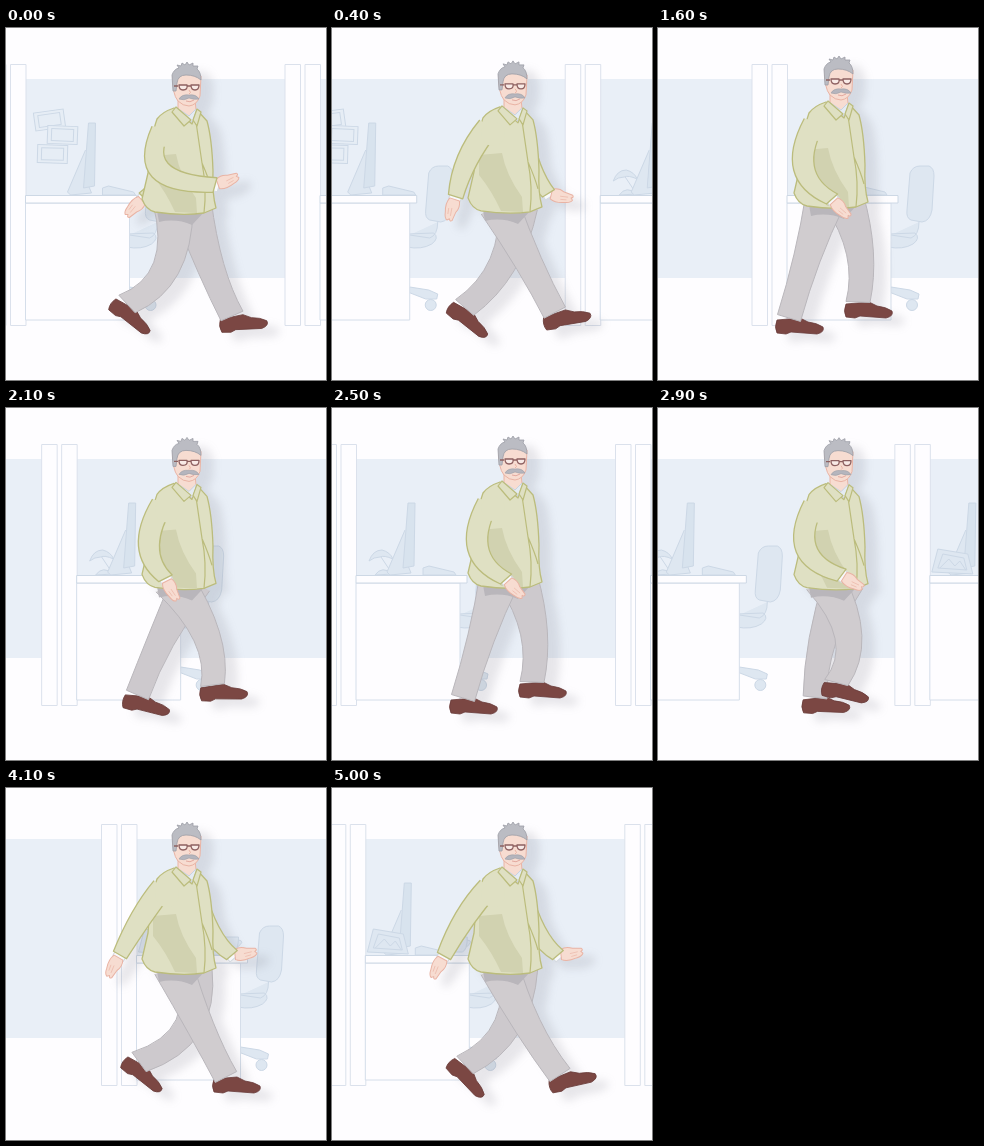
An HTML page with a canvas for the animation above (5.1 s loop, 320 by 352 pixels).

```html
<!DOCTYPE html>
<html lang="en">
<head>
<meta charset="utf-8">
<title>Office walk</title>
<style>
  html, body { margin: 0; width: 100%; height: 100%; overflow: hidden; background: #fefdff; }
  canvas { display: block; }
</style>
</head>
<body>
<canvas id="stage" width="320" height="352"></canvas>
<script>
const stage = document.getElementById('stage').getContext('2d');
const layer = document.createElement('canvas');
layer.width = 320;
layer.height = 352;
const figure = layer.getContext('2d');
let c = stage;

const LOOP = 5100, STEP = 100, STRIDE = 912, SPACING = 294.5;
const WHITE = '#fefdff', LINE = '#ccd8e6', PALE = '#dee7f1';
const OLIVE = '#dfe0c3', OLIVE_EDGE = '#bbbc7c', SKIN = '#f7dcd1', SKIN_EDGE = '#e9b3a4';

// Pose: bob, near elbow + wrist, far elbow + wrist,
// near knee + ankle + foot angle, far knee + ankle + foot angle
const contactA = [0, 154, 142, 209, 157, 161, 148, 138, 170, 160, 240, 121, 276, 34, 205, 240, 226, 288, -7];
const reachA = [0, 154, 142, 210, 157, 160, 147, 136, 169, 157, 241, 118, 278, 38, 206, 238, 229, 288, -11];
const passA = [-6, 146, 140, 174, 171, 180, 125, 175, 158, 149, 230, 131, 290, 0, 202, 225, 200, 274, 0];
const reachB = [0, 133, 130, 112, 168, 205, 143, 226, 167, 196, 238, 228, 287, -17, 175, 238, 133, 277, 42];
const contactB = [0, 135, 130, 114, 167, 205, 143, 226, 167, 195, 240, 220, 289, 0, 182, 238, 133, 274, 34];
const passB = [...passA.slice(0, 9), ...passA.slice(14), ...passA.slice(9, 14)];
const walk = [[0, contactA], [226, passB], [440, reachB], [452, contactB],
  [664, passA], [688, passA], [900, reachA], [STRIDE, contactA]];
const scroll = [[0, [0]], [900, [103]], [1600, [185]], [2500, [290]],
  [3400, [395]], [4100, [478]], [LOOP, [586]]];

function sample(keys, t) {
  const i = keys.findIndex(k => k[0] > t);
  const [t0, a] = keys[i - 1], [t1, b] = keys[i];
  return a.map((v, n) => v + (b[n] - v) * (t - t0) / (t1 - t0));
}

function paint(fill, edge, width = 1) {
  if (fill) { c.fillStyle = fill; c.fill(); }
  if (edge) { c.strokeStyle = edge; c.lineWidth = width; c.stroke(); }
}
function shape(d, fill, edge, width) {
  const path = new Path2D(d);
  if (fill) { c.fillStyle = fill; c.fill(path); }
  if (edge) { c.strokeStyle = edge; c.lineWidth = width || 1; c.stroke(path); }
}
function box(x, y, w, h, fill, edge = LINE) {
  c.beginPath();
  c.rect(x, y, w, h);
  paint(fill, edge);
}
function placed(x, y, angle, draw) {
  c.save();
  c.translate(x, y);
  c.rotate(angle);
  draw();
  c.restore();
}

// Tapered limb through three joints, with no edge across its top
function limb(points, widths, fill, edge, lineWidth) {
  const side = s => points.map(([x, y], i) => {
    const a = points[Math.max(i - 1, 0)], b = points[Math.min(i + 1, 2)];
    const dx = b[0] - a[0], dy = b[1] - a[1], k = s * widths[i] / Math.hypot(dx, dy);
    return [x - dy * k, y + dx * k];
  });
  const curve = ([p, q, r]) =>
    c.quadraticCurveTo(2 * q[0] - (p[0] + r[0]) / 2, 2 * q[1] - (p[1] + r[1]) / 2, ...r);
  const left = side(1), right = side(-1).reverse();
  c.beginPath();
  c.moveTo(...left[0]);
  curve(left);
  c.lineTo(...right[0]);
  curve(right);
  paint(fill, edge, lineWidth);
}

function arm(shoulder, ex, ey, wx, wy, widths) {
  const angle = Math.atan2(wy - ey, wx - ex);
  placed(wx, wy, angle, () => box(-2, -6, 6, 12, '#f8f9fb', '#d3d8df'));
  // The hand lifts as it reaches forward
  placed(wx, wy, angle - 0.021 * Math.max(0, wx - 180), () => {
    shape('M3-5 Q9-8 15-5 L24-4 Q26-2 23-1 L25 1 Q24 4 18 5 Q9 8 3 5Z', SKIN, SKIN_EDGE);
    shape('M12 0 L20-1 M13 3 L19 2', null, SKIN_EDGE, 0.6);
  });
  limb([shoulder, [ex, ey], [wx, wy]], widths, OLIVE, OLIVE_EDGE, 1.3);
}

function leg(hip, kx, ky, ax, ay, degrees, fill) {
  placed(ax, ay, degrees * Math.PI / 180, () => shape(
    'M-12 2 Q-15 9-12 15 L-3 16 L2 14 L28 16 Q36 14 34 9 Q28 5 19 4 L11 0Z', '#7b4743', '#6a3d3b', 0.8));
  limb([hip, [kx, ky], [ax, ay]], [20, 13.5, 12], fill, '#b9b6bb', 1);
}

function head() {
  shape('M172 68 L172 82 L186 94 L190 82 L189 70Z', SKIN, SKIN_EDGE);
  shape('M171 80 L183 88 L190 81 L191 97 L186 94Z', '#e4ebf3', '#c8d3e0');
  shape('M167 48 Q166 66 172 73 Q177 78 183 78 Q191 77 194 68 L195 48 Q181 38 167 48Z', SKIN, SKIN_EDGE);
  shape('M167 63 L166 47 Q168 41 173 40 L171 37 L175 38 L176 35 L179 37 L181 34 L183 37 L187 35 L187 38 L192 38 L191 41 Q195 44 195 52 Q189 47 180 47 Q172 47 171 55 L170 63Z', '#bbbcc3', '#9c9ea6', 0.8);
  shape('M168 58 L172 58 M173 57 H181 Q182 62 177 62 Q173 62 173 57Z M185 57 H193 Q193 62 189 62 Q185 62 185 57Z M181 58 H185', '#f8eae6', '#8d6060', 1.3);
  shape('M183 62 Q186 65 183 66', null, SKIN_EDGE);
  shape('M173 71 Q176 66 183 67 Q190 66 193 71 Q188 72 183 70 Q178 73 173 71Z', '#b5b5bd', '#9d9ea7', 0.6);
  shape('M180 73 Q184 75 188 72', null, '#e3aaa0');
}

function jacket() {
  shape('M168 80 Q156 84 151 91 Q144 111 142 145 L136 171 Q140 182 149 184 Q176 188 198 185 L210 180 Q206 166 207 143 Q206 111 201 93 L191 82 L186 96Z', OLIVE, OLIVE_EDGE, 1.3);
  shape('M147 128 L170 126 Q174 148 190 170 L191 185 L169 184 Q160 164 147 148Z', '#d1d2b0');
  shape('M190 94 Q193 115 196 135 Q201 160 198 185 M196 135 Q203 151 206 162', null, OLIVE_EDGE, 1.2);
  shape('M170 79 L166 84 L178 98 L185 92Z M191 81 L195 84 L191 98 L187 92Z', OLIVE, OLIVE_EDGE, 1.2);
}

function man(pose) {
  const [bob, nex, ney, nwx, nwy, fex, fey, fwx, fwy, ...legs] = pose;
  c = figure;
  c.clearRect(0, 0, 320, 352);
  c.lineJoin = 'round';
  arm([190, 103 + bob], fex, fey, fwx, fwy, [9, 9, 7]);
  leg([186, 178 + bob], ...legs.slice(5), '#cdc9cd');
  leg([167, 178 + bob], ...legs.slice(0, 5), '#d0cccf');
  shape(`M151 ${183 + bob} H199 L186 ${197 + bob} Q170 ${190 + bob} 153 ${194 + bob}Z`, '#b9b6bb');
  placed(0, bob, 0, () => { head(); jacket(); });
  arm([157, 99 + bob], nex, ney, nwx, nwy, [11, 10.5, 7.5]);
  // Blend the sleeve into the shoulder
  c.beginPath();
  c.arc(161, 107 + bob, 12, 0, 7);
  paint(OLIVE);
  c = stage;
  c.save();
  c.shadowColor = 'rgba(110, 112, 122, 0.16)';
  c.shadowBlur = 8;
  c.shadowOffsetX = 12;
  c.shadowOffsetY = 8;
  c.drawImage(layer, 0, 0);
  c.restore();
}

function chair() {
  shape('M123 145 Q126 138 133 138 L142 138 Q147 140 147 148 L145 182 Q143 193 135 194 L124 192 Q119 190 120 182Z', PALE, LINE);
  shape('M132 194 Q132 207 124 210 L104 207 M101 206 L128 205 Q134 210 126 216 Q116 222 101 219Z', PALE, LINE);
  shape('M104 259 L102 264 L120 271 L131 271 L132 266 L123 262Z', PALE, LINE);
  c.beginPath();
  c.arc(125, 277, 5.5, 0, 7);
  paint(PALE, LINE);
}

function monitor(x) {
  shape(`M${x + 2} 122 L${x - 16} 164 L${x - 13} 167 L${x + 8} 165 L${x + 4} 155`, PALE, LINE);
  shape(`M${x + 5} 95 L${x + 12} 95 L${x + 11} 158 L${x} 160Z`, '#d8e3ee', LINE);
}
function keyboard(x) {
  shape(`M${x} 160 L${x + 6} 158 L${x + 31} 164 L${x + 33} 167 L${x} 167Z`, PALE, LINE);
}

const desks = [
  () => { // lamp
    shape('M13 153 Q17 142 26 142 Q34 144 37 151 Q28 147 24 149 Q18 149 13 153Z M25 149 L33 161 M19 167 Q26 157 37 166Z', PALE, LINE);
    monitor(47);
    keyboard(67);
  },
  () => { // framed picture and mug
    monitor(34);
    shape('M8 141 L38 146 L43 166 L2 164Z M13 146 L34 150 L37 162 L8 160Z M10 160 L19 151 L25 158 L30 153 L36 162', PALE, LINE);
    keyboard(50);
    shape('M84 149 H102 Q102 162 97 164 H89 Q84 162 84 149Z M102 152 Q109 153 101 159', PALE, LINE);
  },
  () => { // pinned sheets
    [[24, 92, -0.14], [37, 107, 0.04], [27, 126, 0.03]].forEach(([x, y, a]) =>
      placed(x, y, a, () => {
        box(-15, -9, 30, 18, '#e6edf5');
        box(-11, -6, 22, 12);
      }));
    monitor(58);
    keyboard(77);
  }
];

function cubicle(x, kind) {
  c.fillStyle = WHITE;
  c.fillRect(x, 36, 35, 262);
  for (const dx of [0, 20]) box(x + dx, 36.5, 15.5, 261, WHITE, '#dbe1ec');
  placed(x + 35, 0, 0, () => {
    chair();
    desks[kind]();
    box(0, 175, 104, 117, WHITE, '#d5deea');
    box(0, 167.5, 111, 7.5, WHITE, '#cdd8e5');
  });
}

function frame() {
  const t = Math.floor(performance.now() / STEP) * STEP % LOOP;
  const [offset] = sample(scroll, t);
  c.fillStyle = WHITE;
  c.fillRect(0, 0, 320, 352);
  c.fillStyle = '#e9eff7';
  c.fillRect(0, 51, 320, 199);
  for (let i = -1; i < 3; i++) cubicle(279 + i * SPACING - offset, (i + 3) % 3);
  man(sample(walk, t % STRIDE));
  requestAnimationFrame(frame);
}
frame();
</script>
</body>
</html>
```
